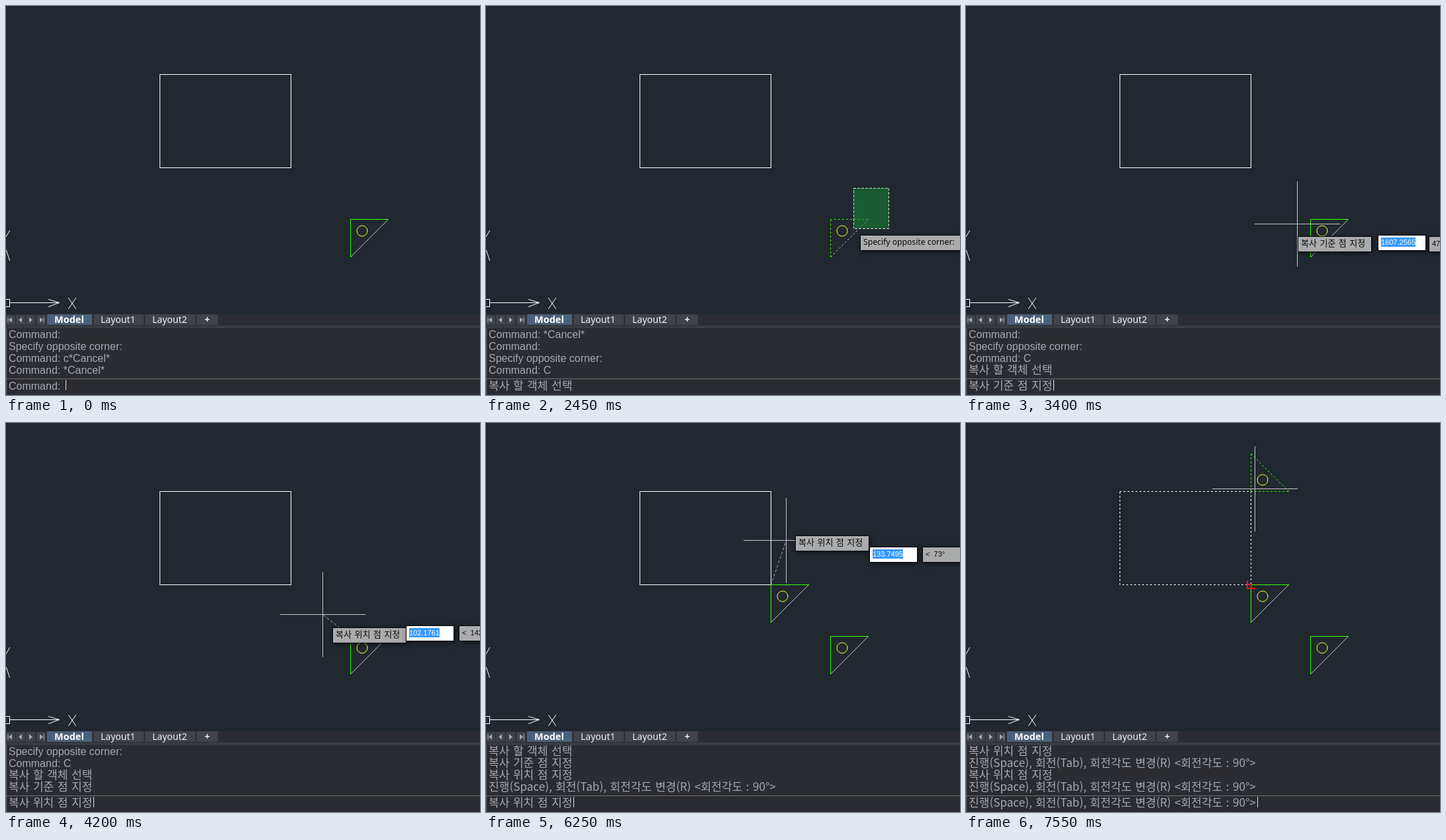
Animation of 716 by 588 pixels, one loop 8 s. Source, as an HTML page with a canvas:

```html
<!DOCTYPE html>
<html lang="ko">
<head>
<meta charset="utf-8">
<style>
html, body { margin: 0; width: 716px; height: 588px; overflow: hidden; background: #212830; }
canvas { display: block; }
</style>
</head>
<body>
<canvas id="stage" width="716" height="588"></canvas>
<script>
const ctx = document.getElementById('stage').getContext('2d');
const LOOP = 8000, STEP = 50, ARM = 64, UNITS = 1.888108;
const LATIN = '16px "Liberation Sans", sans-serif';
const hangul = size => `300 ${size}px "Noto Sans CJK KR", "Noto Sans CJK", sans-serif`;
const GREEN = '#38ff00', YELLOW = '#ffff28', WHITE = '#fff', GREY = '#c4c6c8', RED = '#f01410';

const PICK = '복사 할 객체 선택', FROM = '복사 기준 점 지정', TO = '복사 위치 점 지정';
const GO = '진행(Space), 회전(Tab), 회전각도 변경(R) <회전각도 : 90°>';
const CORNER = 'Specify opposite corner:';
const LINES = ['Command:', CORNER, 'Command: c*Cancel*', 'Command: *Cancel*', 'Command:',
  CORNER, 'Command: C', PICK, FROM, TO, GO, TO, GO, GO];
// Each entry moves the prompt on by one line.
const ENTERS = [700, 1000, 1500, 2800, 3800, 5150, 6000, 7200, 7400];

// Pointer path: time, x, y
const PATH = [[0, 790, 300], [600, 660, 262], [700, 660, 262], [950, 627, 247],
  [1750, 627, 247], [2100, 608, 275], [2350, 608, 275], [2450, 555, 336], [2600, 505, 392],
  [2950, 505, 392], [3350, 491, 332], [3400, 500, 329], [3700, 520, 322], [3800, 520, 322],
  [4600, 435, 255], [4650, 430, 244], [5400, 430, 244], [5750, 481, 200], [6000, 481, 200],
  [6200, 457, 154], [6250, 453, 177], [6600, 436, 99], [LOOP, 436, 99]];

function pointer(t) {
  const i = Math.max(1, PATH.findIndex(p => p[0] >= t));
  const [t0, x0, y0] = PATH[i - 1], [t1, x1, y1] = PATH[i];
  const k = Math.max(0, (t - t0) / (t1 - t0));
  return [x0 + (x1 - x0) * k, y0 + (y1 - y0) * k];
}

const within = (t, a, b) => t >= a && t < b;

function box(x, y, w, h, fill) {
  ctx.fillStyle = fill;
  ctx.fillRect(x, y, w, h);
}

// Segments are separate, so a dash pattern starts anew at every corner.
function line(points, color, dash = [], width = 1) {
  const snapped = points.map(p => p.map(v => Math.round(v) + width % 2 / 2));
  ctx.strokeStyle = color;
  ctx.lineWidth = width;
  ctx.lineCap = dash.length ? 'butt' : 'square';
  ctx.setLineDash(dash);
  ctx.lineDashOffset = .5;
  ctx.beginPath();
  for (let i = 1; i < snapped.length; i++) {
    ctx.moveTo(...snapped[i - 1]);
    ctx.lineTo(...snapped[i]);
  }
  ctx.stroke();
  ctx.setLineDash([]);
}

function frame(x, y, w, h, color, dash, width) {
  line([[x, y], [x + w, y], [x + w, y + h], [x, y + h], [x, y]], color, dash, width);
}

function setFont(font) {
  ctx.font = font;
  ctx.wordSpacing = font.includes('CJK') ? '1.6px' : '0px';
}

function text(s, x, y, font, color) {
  setFont(font);
  ctx.fillStyle = color;
  ctx.fillText(s, x, y);
  return ctx.measureText(s).width;
}

function shape(points, color) {
  ctx.fillStyle = color;
  ctx.beginPath();
  points.forEach(p => ctx.lineTo(...p));
  ctx.fill();
}

function triangle(x, y, dashed, turned) {
  const dash = dashed ? [3, 3] : [], s = turned ? -57 : 57;
  line([[x + 57, y], [x, y + s]], turned ? GREEN : GREY, dash);
  line([[x, y + s], [x, y], [x + 57, y]], GREEN, dash);
  ctx.strokeStyle = YELLOW;
  ctx.beginPath();
  ctx.arc(x + 18, y + (turned ? -17 : 18), 8, 0, 7);
  ctx.stroke();
}

function star(x, y, r) {
  for (const [dx, dy] of [[r, 0], [0, r], [r, r], [r, -r]])
    line([[x - dx, y - dy], [x + dx, y + dy]], RED);
}

function panel(x, y, w, h, fill) {
  ctx.save();
  ctx.shadowColor = 'rgba(0,0,0,.7)';
  ctx.shadowBlur = 7;
  ctx.shadowOffsetX = ctx.shadowOffsetY = 2;
  box(x, y, w, h, fill);
  ctx.restore();
  frame(x, y, w, h, '#080a0c');
}

function tip(s, x, y) {
  x = Math.round(x);
  y = Math.round(y);
  const font = s === CORNER ? '12.2px "Noto Sans", sans-serif' : hangul(13);
  setFont(font);
  panel(x, y, Math.round(ctx.measureText(s).width) + 14, 23, '#aaabac');
  text(s, x + 5, y + 15, font, '#08090a');
}

function valueBox(s, x, y, selected) {
  x = Math.round(x);
  y = Math.round(y);
  const font = '11px "Liberation Sans", sans-serif';
  panel(x, y, 72, 23, selected ? WHITE : '#aaabac');
  setFont(font);
  if (selected) box(x + 5, y + 4, ctx.measureText(s).width, 14, '#3399ff');
  text(s, x + 5, y + 15, font, selected ? WHITE : '#08090a');
}

function axes() {
  line([[5, 339], [0, 348]], WHITE);
  line([[0, 369], [5, 384]], WHITE);
  frame(-6, 443, 11, 11, WHITE);
  line([[5, 448], [80, 448]], WHITE);
  line([[64, 443], [80, 448], [64, 454]], WHITE);
  line([[94, 441], [105, 457]], WHITE);
  line([[105, 441], [94, 457]], WHITE);
}

function tabs() {
  const font = '14px "Noto Sans", sans-serif';
  box(0, 466, 716, 18, '#2b2c31');
  box(0, 483, 716, 4, '#383c44');
  [0, 15, 30, 46].forEach((x, i) => {
    const d = i < 2 ? -1 : 1, c = x + 7;
    box(x, 467, 14, 15, '#3f4248');
    shape([[c + 3 * d, 474.5], [c - 2 * d, 470.5], [c - 2 * d, 478.5]], '#a6aab0');
    if (i % 3 === 0) box(c + 4 * d - .5, 470, 1, 9, '#a6aab0');
  });
  box(62, 466, 68, 16, '#4b607c');
  text('Model', 73, 479, 'bold 14.5px "Noto Sans", sans-serif', WHITE);
  [['Layout1', 132, 76], ['Layout2', 210, 76], ['+', 288, 32]].forEach(([s, x, w]) => {
    box(x, 466, w, 16, '#404349');
    text(s, x + (s === '+' ? 12 : 11), 479, s === '+' ? 'bold ' + font : font, '#f0f0f0');
  });
}

function consoleText(n, t) {
  const write = (s, y) => text(s, 4, y, /[가-힣]/.test(s) ? hangul(17.1) : LATIN, '#a4a8b2');
  box(0, 487, 716, 101, '#2b2c31');
  box(0, 487, 2, 101, '#454a53');
  box(2, 487, 1, 101, '#1e2126');
  box(0, 563, 716, 1, '#6a6d73');
  for (let i = 0; i < 4; i++) write(LINES[n - 4 + i], 502 + 18 * i);
  const prompt = LINES[n].replace(/ C$/, '');
  const w = write(prompt, 580);
  const since = t - (ENTERS[n - 5] || 0);
  if (n !== 6 && since % 1400 < 700)
    box(Math.round(4 + w + (prompt === 'Command:' ? 8 : 2)), 565, 1, 16, '#e0e0e0');
}

function suggestions(x, y) {
  const font = '10.5px "Noto Sans", sans-serif';
  const names = ['C', 'CAL', 'CANNOSCALE', 'CANNOSCALEVAR', 'CATALOG (DIR , )', 'CDATE', 'CECOLOR'];
  panel(x, y + 16, 110, 94, WHITE);
  frame(x, y + 16, 110, 94, '#2a72d0');
  box(x, y, 40, 16, WHITE);
  text('c', x + 2, y + 12, '12px "Noto Sans", sans-serif', '#000');
  box(x + 8, y + 2, 1, 12, '#000');
  box(x + 1, y + 17, 109, 14, '#1f74d4');
  names.forEach((s, i) => text(s, x + 2, y + 29 + 13 * i, font, i ? '#000' : WHITE));
  const arrow = [[0, 0], [0, 15], [3, 12], [6, 18], [8, 17], [6, 11], [10, 11]];
  shape(arrow.map(([a, b]) => [x - 22 + a, y - 1 + b]), WHITE);
}

function selection(x0, y0, x, y) {
  const [l, u, w, h] = [Math.min(x0, x), Math.min(y0, y), Math.abs(x - x0), Math.abs(y - y0)];
  box(l, u, w, h, 'rgba(20,130,50,.58)');
  frame(l, u, w, h, '#d0d8d0', [4, 2]);
  tip(CORNER, x + 10, y + 10);
}

function crosshair(x, y, n) {
  if (n !== 7) {
    const color = n === 6 ? '#dcdddf' : GREY;
    line([[x - ARM, y], [x + ARM, y]], color);
    line([[x, y - ARM], [x, y + ARM]], color);
  }
  if (n < 8) frame(x - 5, y - 5, 10, 10, '#dcdddf');
}

// The boxes trail the pointer a little.
function inputTips(n, t, x, y, base) {
  const [px, py] = pointer(t - 50), [qx, qy] = pointer(t - 14);
  tip(n === 8 ? FROM : TO, px + 10, py + 16);
  if (!base) {
    valueBox((663.2025 + x * UNITS).toFixed(4), qx + 125, qy + 16, true);
    valueBox((1094 - y * UNITS).toFixed(4), px + 208, py + 16);
    return;
  }
  const dist = Math.hypot(x - base[0], y - base[1]) * UNITS;
  const angle = Math.atan2(base[1] - py, px - base[0]) * 180 / Math.PI;
  if (!within(t, 4800, 5150)) valueBox(dist.toFixed(4), qx + 125, qy + 16, true);
  valueBox('<  ' + Math.round((angle + 360) % 360) + '°', qx + 205, qy + 16);
}

function draw(t) {
  const n = 4 + ENTERS.filter(e => t >= e).length;
  const [x, y] = pointer(t);
  const held = within(t, 5150, 5750);
  const base = n === 9 ? [520, 322] : n === 11 ? [430, 244] : null;
  const snap = within(t, 4650, 5150) ? 244 : within(t, 6850, 7200) ? 103 : 0;

  box(0, 0, 716, 588, '#212830');
  axes();
  frame(232, 103, 198, 141, WHITE, held || n > 11 ? [3, 3] : []);
  triangle(520, 322, within(t, 2400, 2800));
  if (n > 9) triangle(430, 244, held);
  if (n > 11) triangle(430, 103, true, n > 12);
  if (base) line([base, [x, y]], '#a8abae', [4, 3]);

  if (n === 5) selection(660, 262, x, y);
  else if (within(t, 2350, 2700)) selection(608, 275, x, y);
  else {
    crosshair(x, y, n);
    if (n === 7) tip(PICK, x + 10, y + 10);
  }

  if (snap) {
    star(331, 173, 6);
    star(539, 341, 4);
    frame(425, snap - 5, 12, 12, RED, [], 2);
  }
  if (n > 11) {
    line([[425, 239], [425, 250], [436, 250]], RED, [], 2);
    line([[425, 244], [431, 244], [431, 249]], RED, [], 2);
  }
  if (n === 8 || base) inputTips(n, t, x, y, base);
  if (within(t, 1250, 1500)) suggestions(x + 10, y + 10);

  tabs();
  consoleText(n, t);
}

function tick(now) {
  draw(Math.floor(now % LOOP / STEP) * STEP);
  requestAnimationFrame(tick);
}
requestAnimationFrame(tick);
</script>
</body>
</html>
```
